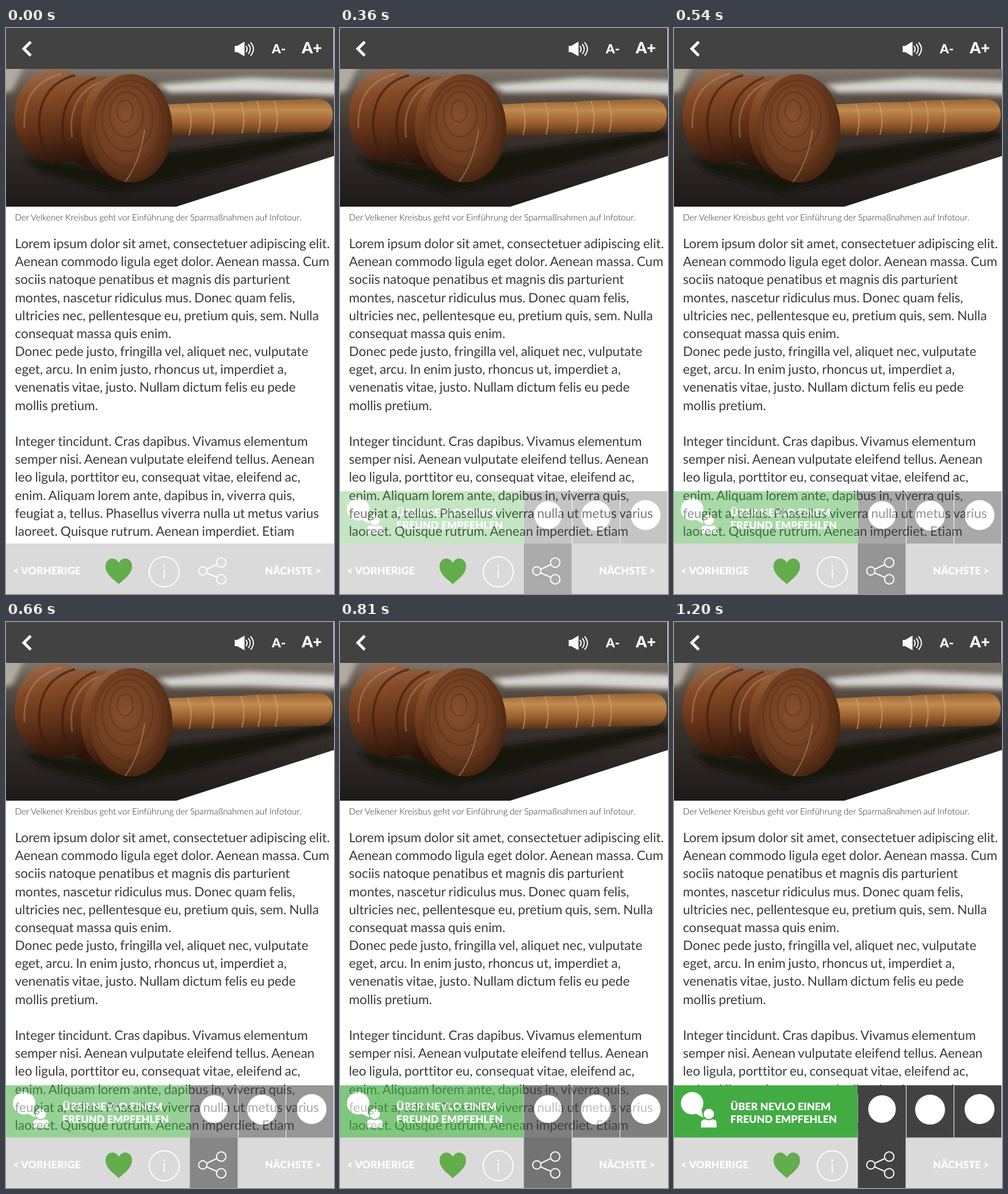
An HTML page that plays this animation: 570 by 982 pixels, repeating every 4870 ms.

```html
<!DOCTYPE html>
<html lang="de">
<head>
<meta charset="utf-8">
<title>Artikelansicht</title>
<style>
  html, body { margin: 0; width: 100%; height: 100%; overflow: hidden; background: #fff; }
  svg { display: block; width: 100%; height: 100%; }
  text {
    font-family: Lato, sans-serif; font-variant-ligatures: none;
    text-rendering: geometricPrecision; white-space: pre;
  }
  .body, .caption { word-spacing: -.04em; }
  .body { fill: #3a3a3a; }
  .caption { fill: #2a2a2a; font-weight: 300; }
  .label { fill: #fff; font-weight: 900; font-size: 18px; }
  .line { fill: none; stroke: #fff; stroke-width: 2; }
</style>
</head>
<body>
<svg viewBox="0 0 570 982">
  <defs>
    <linearGradient id="table" x2="0" y2="1">
      <stop offset="0" stop-color="#7d756b"/>
      <stop offset=".2" stop-color="#574d44"/>
      <stop offset=".45" stop-color="#3a322d"/>
      <stop offset="1" stop-color="#1d1a19"/>
    </linearGradient>
    <linearGradient id="handle" x2="0" y2="1">
      <stop offset="0" stop-color="#94602f"/>
      <stop offset=".3" stop-color="#c08a50"/>
      <stop offset=".65" stop-color="#9a602e"/>
      <stop offset="1" stop-color="#4f2d14"/>
    </linearGradient>
    <linearGradient id="barrel" x2=".15" y2="1">
      <stop offset="0" stop-color="#9a7257"/>
      <stop offset=".3" stop-color="#854a26"/>
      <stop offset=".65" stop-color="#5e2f17"/>
      <stop offset="1" stop-color="#29130a"/>
    </linearGradient>
    <radialGradient id="face" cx=".42" cy=".4" r=".65">
      <stop offset="0" stop-color="#85502d"/>
      <stop offset=".6" stop-color="#6f3d20"/>
      <stop offset="1" stop-color="#40210f"/>
    </radialGradient>
    <filter id="soft" x="-20%" y="-50%" width="140%" height="200%"><feGaussianBlur stdDeviation="5"/></filter>
    <clipPath id="photo"><path d="M0 71H570V310H0Z"/></clipPath>
  </defs>

  <g clip-path="url(#photo)">
    <path fill="url(#table)" d="M0 71H570V310H0Z"/>
    <g filter="url(#soft)">
      <path fill="#b0aaa1" d="M-10 60H34L12 108L-10 116Z"/>
      <path fill="#d9d7d4" d="M262 98L420 86L590 92V118L420 111L285 112Z"/>
      <path fill="#171311" d="M30 225L140 240L290 215L560 178L575 190L300 262L190 285L60 250Z"/>
    </g>
    <path fill="#fff" d="M296 310L570 222V310Z"/>
    <path fill="url(#handle)" d="M270 133L350 129L410 128L430 126L545 123Q568 127 568 152Q566 177 545 180L420 183L360 186L275 187Z"/>
    <path fill="none" stroke="#d9a878" stroke-width="2" opacity=".6" d="M316 132Q326 158 318 186M356 130Q366 157 358 185M408 129Q418 155 410 183M436 127Q446 154 438 182M466 126Q476 153 468 181"/>
    <path fill="url(#barrel)" d="M75 72C100 70 112 76 121 82L178 84L150 246L112 230L80 236C38 226 15 196 15 152C17 108 42 76 75 72Z"/>
    <path fill="none" stroke="#3d1c0c" stroke-width="4" opacity=".65" d="M120 82C70 95 55 135 58 176C62 207 70 222 82 235M156 86C108 104 93 145 100 192Q106 219 122 235"/>
    <path fill="none" stroke="#d3a27a" stroke-width="3" opacity=".35" d="M97 79C42 94 30 132 32 174M172 91C121 106 109 150 115 190"/>
    <path fill="url(#barrel)" d="M208 80C155 80 130 122 130 174C132 224 158 262 207 268Z"/>
    <ellipse cx="217" cy="174" rx="72" ry="94" fill="url(#face)"/>
    <g fill="none" stroke="#4f2813" stroke-width="3" opacity=".35">
      <ellipse cx="207" cy="144" rx="14" ry="19"/>
      <ellipse cx="209" cy="150" rx="29" ry="39"/>
      <ellipse cx="211" cy="157" rx="44" ry="57"/>
      <ellipse cx="214" cy="166" rx="59" ry="75"/>
    </g>
    <path fill="none" stroke="#ca986c" stroke-width="1.5" opacity=".7" d="M241 176Q233 232 207 267"/>
  </g>

  <path fill="#424242" d="M0 0H569V71H0Z"/>
  <path class="line" style="stroke-width:5" d="M43 24L31 36L43 48"/>
  <path fill="#fff" d="M397.500 31H402L414.500 23.500V49L402 42H397.500Z"/>
  <path class="line" d="M417 31Q421 36.500 417 42M421 28Q428 36.500 421 45M425 25Q435 36.500 425 48"/>
  <text class="label" style="font-size:22px" x="462" y="44">A-</text>
  <text class="label" style="font-size:27px" x="514" y="44">A+</text>

  <text class="caption" x="15.500" y="334">Der Velkener Kreisbus geht vor Einführung der Sparmaßnahmen auf Infotour.</text>
  <g id="article"></g>

  <path fill="#dadada" d="M0 894.500H570V982H0Z"/>
  <text class="label" x="12" y="948">&lt; VORHERIGE</text>
  <text class="label" x="548" y="948" text-anchor="end">NÄCHSTE &gt;</text>
  <path fill="#63ad4d" d="M196 965C187 956 173 948 173 934C173 919 190 916 196 928C202 916 219 919 219 934C219 948 205 956 196 965Z"/>
  <circle class="line" cx="275" cy="943.500" r="26"/>
  <circle fill="#fff" cx="275" cy="934" r="1.800"/>
  <path class="line" d="M275 939V955"/>

  <g id="panel" opacity="0">
    <path fill="#42ac42" d="M0 803.800H319V894.500H0Z"/>
    <path fill="#424242" d="M319.500 803.800H569V894.500H402.500V982H319.500Z"/>
    <path class="line" style="stroke-width:1" d="M403.500 804V894M486.500 804V894"/>
    <g fill="#fff">
      <circle cx="31.500" cy="835" r="19.500"/>
      <path d="M36 852L47 844L51 860Z"/>
      <path d="M47 877V870Q47 863 54 863H67Q74 863 74 870V877Z"/>
      <circle cx="60.500" cy="853.500" r="10" stroke="#42ac42" stroke-width="2"/>
      <circle cx="361.500" cy="845" r="24"/>
      <circle cx="445" cy="846" r="26"/>
      <circle cx="531" cy="845" r="26"/>
    </g>
    <text class="label" x="98" y="847">ÜBER NEVLO EINEM</text>
    <text class="label" x="98" y="869">FREUND EMPFEHLEN</text>
  </g>

  <g class="line">
    <path d="M349 939L366 931M349 945.500L366 953"/>
    <circle cx="374" cy="927.500" r="8.200"/>
    <circle cx="342" cy="942" r="7.200"/>
    <circle cx="374" cy="956.500" r="8.200"/>
  </g>
</svg>
<script>
  const lines = `Lorem ipsum dolor sit amet, consectetuer adipiscing elit.
Aenean commodo ligula eget dolor. Aenean massa. Cum
sociis natoque penatibus et magnis dis parturient
montes, nascetur ridiculus mus. Donec quam felis,
ultricies nec, pellentesque eu, pretium quis, sem. Nulla
consequat massa quis enim.
Donec pede justo, fringilla vel, aliquet nec, vulputate
eget, arcu. In enim justo, rhoncus ut, imperdiet a,
venenatis vitae, justo. Nullam dictum felis eu pede
mollis pretium.

Integer tincidunt. Cras dapibus. Vivamus elementum
semper nisi. Aenean vulputate eleifend tellus. Aenean
leo ligula, porttitor eu, consequat vitae, eleifend ac,
enim. Aliquam lorem ante, dapibus in, viverra quis,
feugiat a, tellus. Phasellus viverra nulla ut metus varius
laoreet. Quisque rutrum. Aenean imperdiet. Etiam`.split('\n');

  const LOOP = 4870, FADE = 1200, STEP = 30;
  const LEADING = 31.18, COLUMN = 547.5;
  const article = document.getElementById('article');
  const panel = document.getElementById('panel');

  article.innerHTML = lines.map((line, i) =>
    `<text class="body" x="15.5" y="${382 + i * LEADING}">${line}</text>`).join('');

  // One type size for the article, from the column its first line fills
  article.style.fontSize = '100px';
  const size = 100 * COLUMN / article.firstChild.getComputedTextLength();
  article.style.fontSize = size + 'px';
  document.querySelector('.caption').style.fontSize = size * 0.675 + 'px';

  let start;
  function draw(now) {
    start ??= now;
    const t = (now - start) % LOOP;
    const shown = t < 2 * STEP ? 0 : Math.floor(t / STEP) * STEP / FADE;
    panel.setAttribute('opacity', Math.min(1, shown));
    requestAnimationFrame(draw);
  }
  requestAnimationFrame(draw);
</script>
</body>
</html>
```
